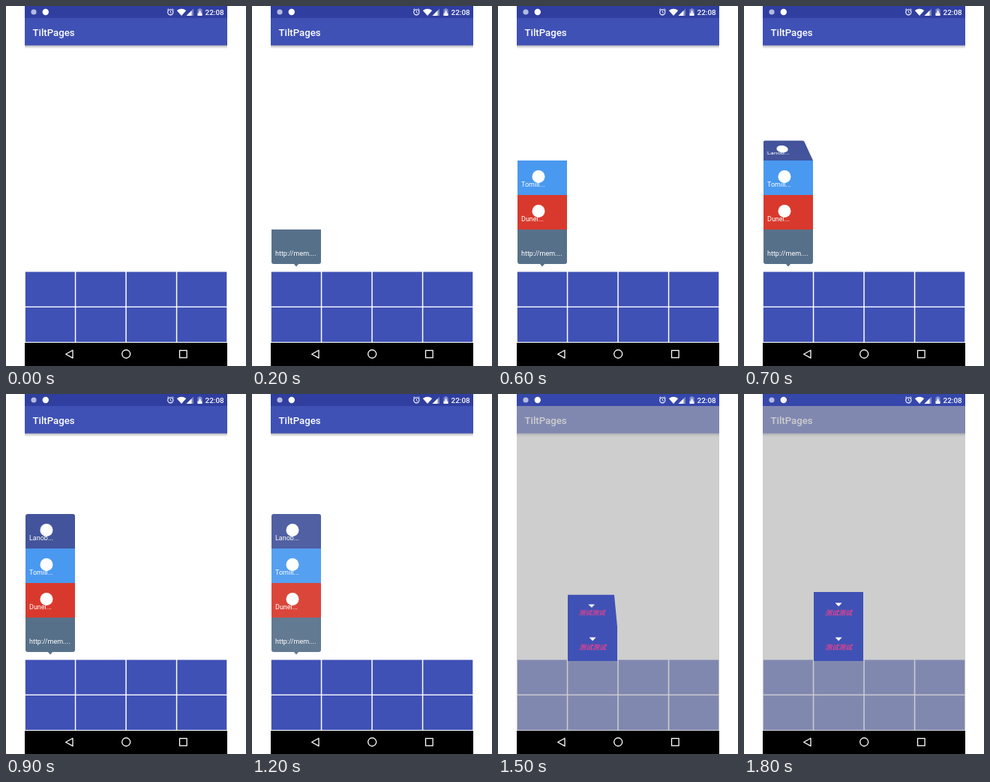
These frames come from a looping animation (320x480 px, 1900 ms). An HTML page:

```html
<!DOCTYPE html>
<html lang="en">
<head>
<meta charset="utf-8">
<title>Flip menu</title>
<style>
  html, body { margin: 0; width: 100%; height: 100%; overflow: hidden; background: #fff; }
  svg { position: absolute; display: block; }
  text { font-family: Roboto, sans-serif; fill: #fff; }
  #stage { left: 0; top: 0; }
  .panel { width: 66px; height: 46px; overflow: visible; transform-origin: 0 100%; }
  .label { font-size: 9px; }
  .test { font: italic 700 9px "Noto Sans CJK SC", "Noto Sans CJK", sans-serif; fill: #dc438f; }
</style>
</head>
<body>
<svg id="stage" width="320" height="480" viewBox="0 0 320 480">
  <defs>
    <linearGradient id="shade" x2="0" y2="1">
      <stop stop-color="#000" stop-opacity=".3"/>
      <stop offset="1" stop-color="#000" stop-opacity="0"/>
    </linearGradient>
  </defs>
  <rect width="320" height="480" fill="#fff"/>
  <rect x="25" y="52" width="270" height="5" fill="url(#shade)"/>
  <rect x="25" y="16" width="270" height="36.5" fill="#3f51b5"/>
  <text x="35.5" y="39.5" font-size="13.2" font-weight="500">TiltPages</text>
  <g id="grid" fill="#3f51b5"></g>
  <rect id="dim" x="25" y="16" width="270" height="433" fill="#adadad" fill-opacity=".6"/>

  <rect id="status" x="25" width="270" height="16"/>
  <circle cx="37" cy="8" r="3.6" fill="#b4bbe0"/>
  <circle cx="52.8" cy="8" r="4.2" fill="#fff"/>
  <g fill="none" stroke="#fff">
    <circle cx="219.3" cy="8.3" r="3.6" stroke-width="1.1"/>
    <path d="M219.3 6v2.6l1.6 1M215 5.3l2-1.8M223.6 5.3l-2-1.8" stroke-width=".9"/>
  </g>
  <g fill="#fff">
    <path d="M227.8 6Q234 1.600 240.200 6L234 13z"/>
    <path d="M250 3.500V13h-9.500z" opacity=".35"/>
    <path d="M247.500 6V13h-7z"/>
    <path d="M255.500 4.300h1.700v-1h2.600v1h1.700V13h-6z" opacity=".4"/>
    <path d="M255.500 9.500h6V13h-6z"/>
    <path d="M259 5l-2 4h1.300v2.500l2-4H259z"/>
  </g>
  <text x="290.7" y="11.800" font-size="9.900" font-weight="500" text-anchor="end">22:08</text>

  <rect x="25" y="449" width="270" height="31" fill="#000"/>
  <g fill="none" stroke="#fff" stroke-width="1.3">
    <path d="M89 459v10.400l-9.300-5.200z" stroke-linejoin="round"/>
    <circle cx="160.200" cy="464" r="5.500"/>
    <rect x="231.500" y="459.300" width="9.600" height="9.600"/>
  </g>
</svg>
<script>
const LOOP = 1900, STEP = 100, FLIP = 200;
const SECOND = 1300, FADE = 1200;
const HEIGHT = 46, EYE = 144;
const byId = id => document.getElementById(id);

let cells = "";
for (let i = 0; i < 8; i++) {
  const x = 25.8 + 67.5 * (i % 4), y = 354.5 + 47.4 * (i >> 2);
  cells += `<rect x="${x}" y="${y}" width="66" height="46"/>`;
}
byId("grid").innerHTML = cells;

function addPanel(left, bottom, index, begin, content) {
  const el = document.createElementNS("http://www.w3.org/2000/svg", "svg");
  el.setAttribute("class", "panel");
  el.style.left = left + "px";
  el.style.top = bottom - HEIGHT * (index + 1) + "px";
  el.innerHTML = content;
  document.body.append(el);
  return { el, begin };
}

const square = "M0 0H66V46H0z";
const roundTop = "M0 46V3Q0 0 3 0H63Q66 0 66 3V46z";
const roundBottom = "M0 0H66V43Q66 46 63 46H36L33 49.500 30 46H3Q0 46 0 43z";
const shareItems = [
  ["http://mem....", "#57708a", roundBottom],
  ["Dunel...", "#d9392d", square],
  ["Tomill...", "#4999f0", square],
  ["Lanob...", "#43549c", roundTop]
];

const sharePanels = shareItems.map(([label, color, shape], i) =>
  addPanel(26, 343.5, i, i * FLIP,
    `<path d="${shape}" fill="${color}"/>` +
    (i ? '<circle cx="28" cy="21.500" r="8.500" fill="#fff"/>' : "") +
    `<text class="label" x="5" y="34.500">${label}</text>`));

const testPanels = [0, 1].map(i =>
  addPanel(93.4, 356, i, 1126 + i * FLIP,
    `<path d="${square}" fill="#3f51b5"/>` +
    '<path d="M28.600 14.500h9l-4.500 4.700z" fill="#fff"/>' +
    '<text class="test" x="15" y="30.500">测试测试</text>'));

function posePanel({ el, begin }, t, shown, opacity) {
  const progress = Math.min(1, (t - begin) / FLIP);
  const visible = shown && progress > 0;
  el.style.display = visible ? "block" : "none";
  if (!visible) return;
  const angle = 90 * (1 - progress);
  el.style.transform = angle ? `perspective(${EYE}px) rotateX(${angle}deg)` : "none";
  el.style.opacity = opacity;
}

function render(time) {
  const t = Math.floor(time % LOOP / STEP) * STEP;
  const second = t >= SECOND;
  byId("dim").style.display = second ? "" : "none";
  byId("status").setAttribute("fill", second ? "#3547ab" : "#303f9f");
  sharePanels.forEach(p => posePanel(p, t, !second, t >= FADE ? 0.93 : 1));
  testPanels.forEach(p => posePanel(p, t, second, 1));
}

const start = performance.now();
function tick() {
  render(performance.now() - start);
  requestAnimationFrame(tick);
}
tick();
</script>
</body>
</html>
```
